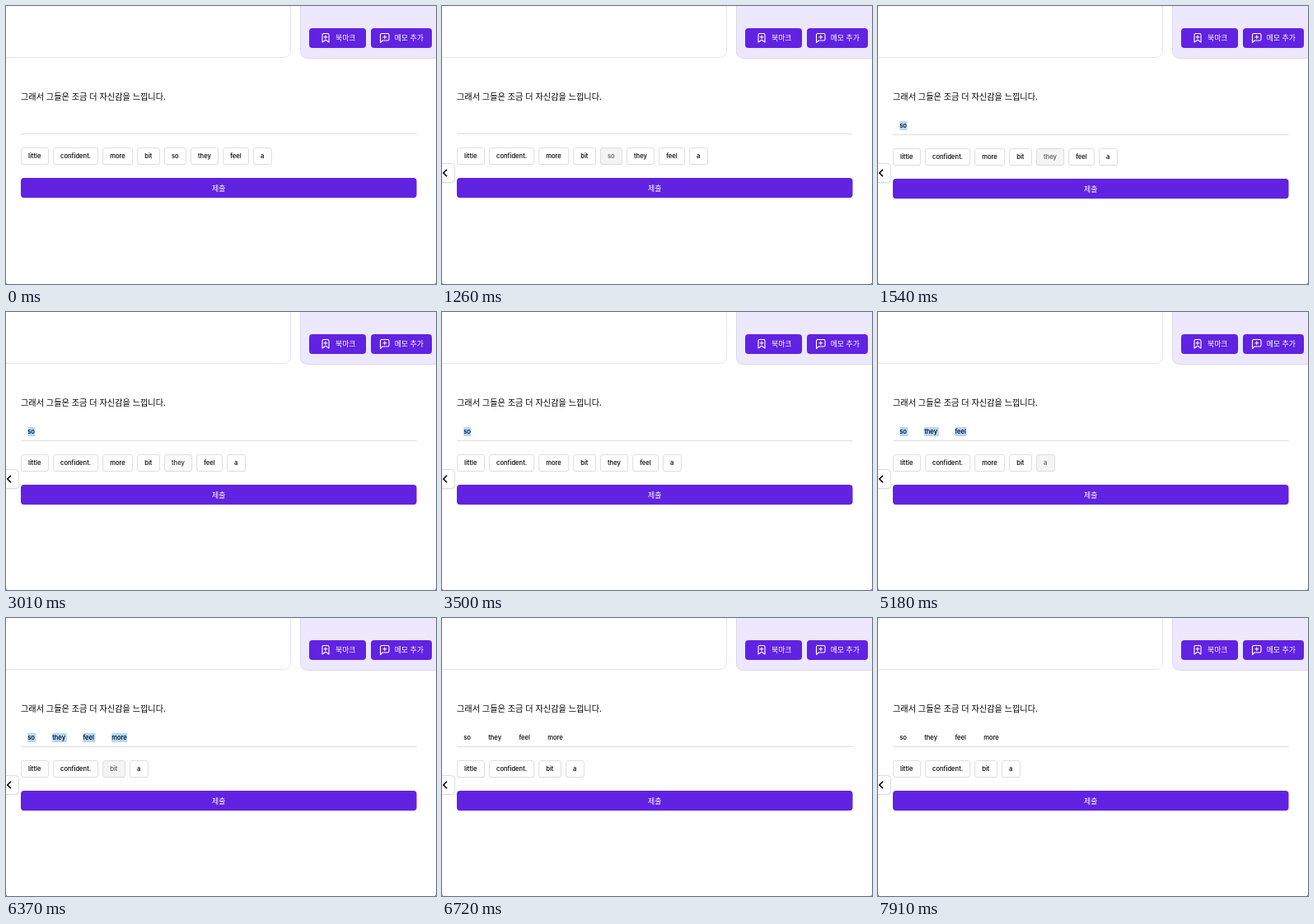
Recreate the animation shown at these times as an HTML page. Size 522 px wide and 338 px high, loop 8 s.

```html
<!DOCTYPE html>
<html lang="ko">
<head>
<meta charset="utf-8">
<style>
  html, body { margin: 0; width: 100%; height: 100%; overflow: hidden; background: #555; }
  svg { display: block; }
  text { font-family: "Noto Sans CJK KR", "Noto Sans CJK", sans-serif; font-size: 8.9px; }
  .label { fill: #fff; font-weight: 500; }
  .word { font: 500 7.62px Inter, sans-serif; }
  .accent { fill: #6122e2; }
  .icon { fill: none; stroke: #fff; stroke-width: 1.1; stroke-linecap: round; stroke-linejoin: round; }
</style>
</head>
<body>
<svg width="522" height="338" viewBox="0 0 522 338">
  <rect width="522" height="338" rx="2" fill="#fff"/>
  <rect x="-20.5" y="-20.5" width="366" height="83" rx="8" fill="#fff" stroke="#e7e2f8"/>
  <rect x="357.5" y="-20.5" width="200" height="84" rx="8" fill="#ede8fd" stroke="#dcd8e8"/>
  <rect class="accent" x="368" y="27" width="69" height="24" rx="4"/>
  <rect class="accent" x="443" y="27" width="74" height="24" rx="4"/>
  <path class="icon" d="M384 44V35q0-1.5 1.5-1.5h5q1.5 0 1.5 1.5v9l-4-2.7zM388 35.8v4M386 37.8h4"/>
  <path class="icon" d="M454.5 44.5V35q0-1.5 1.5-1.5h7.500q1.500 0 1.500 1.500v5.500q0 1.500-1.500 1.500H457zM459.800 35.800v4M457.800 37.800h4"/>
  <text class="label" x="400" y="42">북마크</text>
  <text class="label" x="471.700" y="42">메모 추가</text>
  <text x="18" y="114" style="font-size:10.16px">그래서 그들은 조금 더 자신감을 느낍니다.</text>
  <g id="answer"></g>
  <g id="lower">
    <path d="M18 155.5h480.500" stroke="#dedede"/>
    <g id="bank"></g>
    <rect class="accent" x="18" y="209" width="480.500" height="24.300" rx="4"/>
    <text class="label" x="258.200" y="225" text-anchor="middle">제출</text>
  </g>
  <g id="tab">
    <rect x="-8" y="192.200" width="24" height="23.500" rx="4" fill="#000" opacity=".07"/>
    <rect x="-8.500" y="191.500" width="24" height="23" rx="4" fill="#fff" stroke="#dcdcdc"/>
    <path d="M6 198.800L1.800 203L6 207.200" fill="none" stroke="#000" stroke-width="1.600"/>
  </g>
</svg>
<script>
const LOOP = 8000, TICK = 70;
const $ = id => document.getElementById(id);
const clamp = v => Math.max(0, Math.min(1, v));

const widths = { little: 16, 'confident.': 37.2, more: 19, bit: 9.8, so: 9, they: 16.2, feel: 13.8, a: 5 };
// Tick at which each word moves to the answer line
const picked = { so: 22, they: 64, feel: 74, more: 91 };
const deselect = 96;

// word, enter tick, leave tick, fade-in ticks, fade-out ticks
const hovers = [
  ['so', 17, 22], ['they', 22, 43, 1], ['bit', 44, 45], ['more', 45, 46],
  ['confident.', 46, 47], ['little', 48, 49], ['they', 59, 64], ['feel', 64, 74, 1],
  ['a', 74, 76, 1], ['more', 86, 91], ['bit', 91, 94, 1, 1],
  ['confident.', 104, 111], ['bit', 111, 112]
];

function hoverLevel(word, k) {
  return Math.max(0, ...hovers.filter(h => h[0] === word).map(([, enter, leave, fadeIn = 2, fadeOut = 2]) =>
    Math.min(clamp((k - enter + 1) / fadeIn), clamp(1 - (k - leave + 1) / fadeOut))));
}

const gray = v => `rgb(${v},${v},${v})`;
const wordText = (word, x, y, fill = '#000') => `<text class="word" x="${x}" y="${y}" fill="${fill}">${word}</text>`;

function pill(word, x, level) {
  const w = widths[word] + 17;
  return `<rect x="${x + .5}" y="173.1" width="${w}" height="20.2" rx="2.5" fill="#000" opacity=".08"/>
    <rect x="${x + .5}" y="172.5" width="${w}" height="20" rx="2.5" fill="${gray(255 - 11 * level)}" stroke="#dcdcdc" stroke-width=".9"/>
    ${wordText(word, x + 9, 185, gray(85 * level))}`;
}

function draw(k) {
  const isPicked = word => k >= picked[word];
  let x = 18, out = '';
  for (const word of Object.keys(widths).filter(w => !isPicked(w))) {
    out += pill(word, x, hoverLevel(word, k));
    x += widths[word] + 23;
  }
  $('bank').innerHTML = out;

  x = 26.2;
  out = '';
  Object.keys(picked).filter(isPicked).forEach((word, i, all) => {
    const w = widths[word] + (i < all.length - 1 ? 1.3 : 0);
    if (k < deselect) out += `<rect x="${x}" y="140" width="${w}" height="11" fill="#b3d7fe"/>`;
    out += wordText(word, x, 148);
    x += widths[word] + 21;
  });
  $('answer').innerHTML = out;

  $('lower').setAttribute('transform', `translate(0 ${isPicked('so') ? 1 : 0})`);
  $('tab').setAttribute('opacity', clamp((k - 16) / 2));
}

let last = -1;
function frame() {
  const k = Math.floor(performance.now() % LOOP / TICK);
  if (k !== last) draw(last = k);
  requestAnimationFrame(frame);
}
frame();
</script>
</body>
</html>
```
